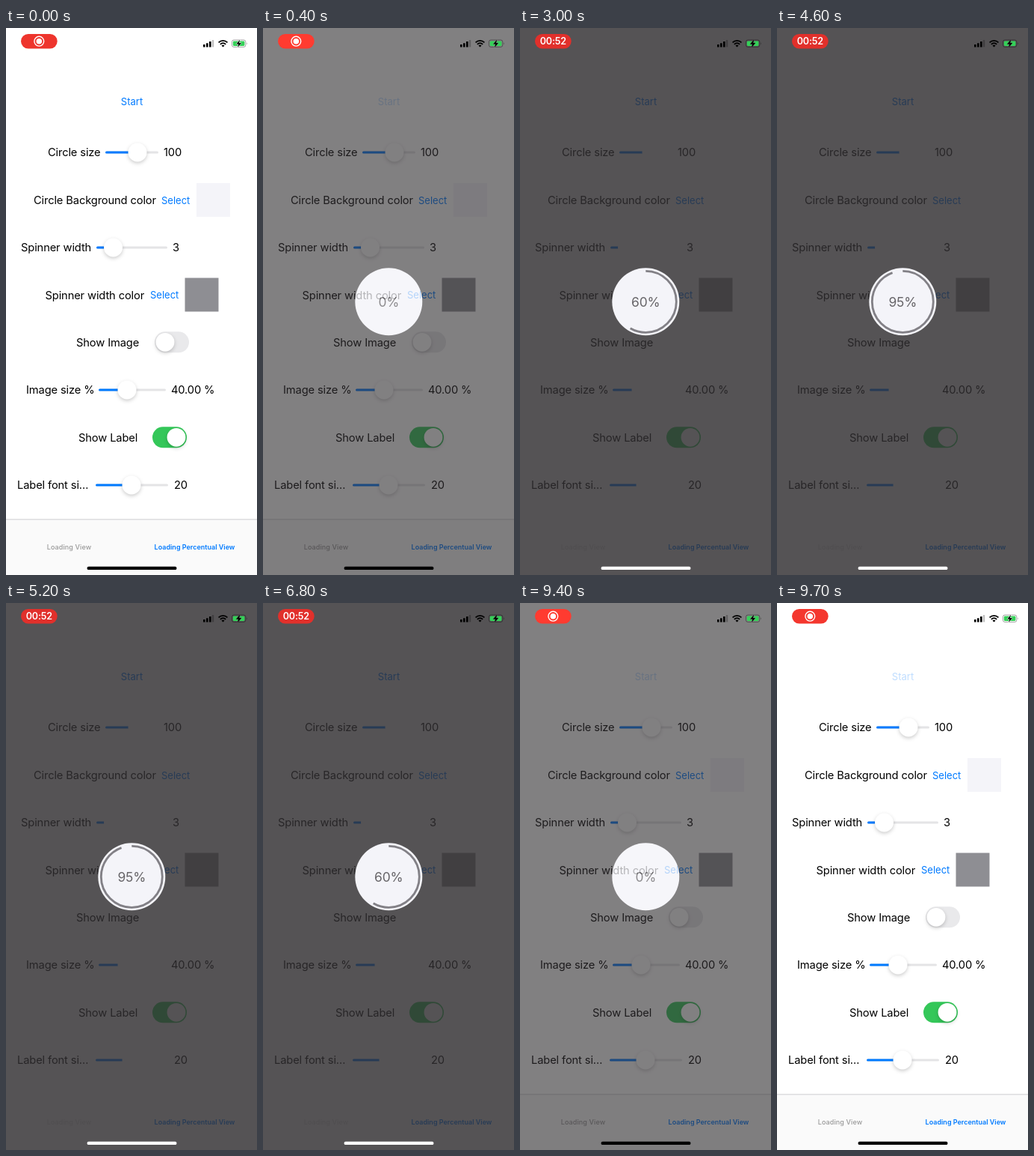
These frames come from a looping animation (336 px wide and 730 px high, 9800 ms). An HTML page:

```html
<!DOCTYPE html>
<html lang="en">
<head>
<meta charset="utf-8">
<title>Loading percentual view</title>
<style>
  html, body { margin: 0; width: 100%; height: 100%; overflow: hidden; background: #fff; }
  svg { display: block; width: 336px; height: 730px; }
  text { font: 14.7px Inter, sans-serif; letter-spacing: -.13px; fill: #000; }
  .link { font-size: 13px; letter-spacing: 0; fill: #007aff; }
  .tab { font-size: 9px; font-weight: 500; letter-spacing: .1px; fill: #999; }
  .tab.on { font-weight: 600; letter-spacing: 0; fill: #007aff; }
  .track { stroke: #e4e4e6; stroke-width: 3; stroke-linecap: round; }
  .fill { stroke: #007aff; stroke-width: 3; stroke-linecap: round; }
  .knob { fill: #fff; filter: drop-shadow(0 2.5px 2.5px #0003); }
  .deep .faint { visibility: hidden; }
  .deep .knob { filter: none; }
  .deep .dull { opacity: .3; }
</style>
</head>
<body>
<svg viewBox="0 0 336 730">
  <rect width="336" height="730" fill="#fff"/>
  <g id="page">
    <g class="faint">
      <rect y="656" width="336" height="74" fill="#fafafa"/>
      <rect y="655" width="336" height="1.5" fill="#dedee0"/>
    </g>
    <text id="start" class="link" x="168.5" y="103" text-anchor="middle">Start</text>
    <rect class="faint" x="255" y="207" width="45" height="45" fill="#f4f4f9"/>
    <rect x="239.5" y="333.5" width="45" height="45" fill="#8e8e93"/>
    <g id="controls"></g>
    <text class="tab dull" x="84.5" y="696" text-anchor="middle">Loading View</text>
    <text class="tab on" x="252.5" y="696" text-anchor="middle">Loading Percentual View</text>
  </g>
  <g id="overlay">
    <rect width="336" height="730" fill="#302e30" opacity=".82"/>
    <circle cx="168.3" cy="365.3" r="45" fill="#f4f4f9"/>
    <circle id="arc" cx="168.3" cy="365.3" r="41" fill="none" stroke="#828086" stroke-width="2.8"
      pathLength="100" transform="rotate(-90 168.3 365.3)"/>
    <text id="percent" x="168.3" y="371.7" text-anchor="middle" style="font-size:17.4px;fill:#666468"></text>
  </g>
  <rect id="pill" x="20" y="8" width="48.7" height="19.5" rx="9.75"/>
  <g id="record">
    <circle cx="44.3" cy="17.7" r="6.4" fill="none" stroke="#fff" stroke-width="1.4"/>
    <circle cx="44.3" cy="17.7" r="3.8" fill="#fff"/>
  </g>
  <text id="clock" x="44.3" y="22.2" text-anchor="middle" style="font-size:12.5px;font-weight:600;fill:#fff">00:52</text>
  <path d="M264 22h2.6v3.4h-2.6zM268 20.2h2.6v5.2H268zM272 18h2.6v7.4H272z"/>
  <path d="M275.8 16h2.4v9.4h-2.4z" opacity=".25"/>
  <g fill="none" stroke="#000" stroke-width="1.9">
    <path d="M284.6 19.3a8.3 8.3 0 0 1 11.8 0M286.9 21.8a5.1 5.1 0 0 1 7.2 0"/>
    <path d="M290.5 25.6l-2-2.1a2.9 2.9 0 0 1 4 0z" fill="#000" stroke="none"/>
  </g>
  <rect x="302.4" y="16" width="18.4" height="9.4" rx="2.6" fill="none" stroke="#000" stroke-opacity=".4" stroke-width=".9"/>
  <rect x="303.8" y="17.4" width="15.6" height="6.6" rx="1.4" fill="#34d158"/>
  <path d="M322 19.2q1.6 1.5 0 3z" opacity=".4"/>
  <path id="bolt" d="M313.2 15.6l-5 5.8h3l-1.2 4.6 5-6h-3z" stroke-width="1" paint-order="stroke"/>
  <rect id="home" x="108.5" y="718.7" width="120" height="4.4" rx="2.2"/>
</svg>
<script>
const $ = id => document.getElementById(id);
const label = (x, y, text, cls = '') => `<text class="${cls}" x="${x}" y="${y + 5.2}">${text}</text>`;
const link = (x, y) => `<text class="link" x="${x}" y="${y + 4.5}">Select</text>`;
const slider = (y, from, knob, to) => `
  <path class="track faint" d="M${from + 1.5} ${y}H${to - 1.5}"/>
  <path class="fill" d="M${from + 1.5} ${y}H${knob}"/>
  <circle class="knob" cx="${knob}" cy="${y}" r="12.5"/>`;
const toggle = (x, y, on) => `<g class="${on ? '' : 'faint'}">
  <rect x="${x}" y="${y - 14}" width="46" height="28" rx="14" fill="${on ? '#34c759' : '#e9e9eb'}"/>
  <circle class="knob" cx="${x + (on ? 32 : 14)}" cy="${y}" r="12.4"/></g>`;

$('controls').innerHTML = [
  label(56, 166, 'Circle size'), slider(166, 133, 176, 204), label(211, 166, '100'),
  label(37, 230, 'Circle Background color'), link(208, 230),
  label(20, 293, 'Spinner width'), slider(293, 121, 143.5, 216), label(223, 293, '3'),
  label(52.5, 356.5, 'Spinner width color'), link(193, 356.5),
  label(94, 419.5, 'Show Image'), toggle(199, 419.3, false),
  label(27, 483, 'Image size %'), slider(483, 124, 162, 214), label(221, 483, '40.00 %'),
  label(97, 546.5, 'Show Label'), toggle(196, 546.3, true),
  label(15, 610, 'Label font si…'), slider(610, 120, 168, 217), label(225, 610, '20')
].join('');

const ramp = (t, from, to) => Math.min(1, Math.max(0, (t - from) / (to - from)));
const smooth = (t, from, to) => { const u = ramp(t, from, to); return u * u * (3 - 2 * u); };
const mix = (a, b, u) => `rgb(${a.map((v, i) => Math.round(v + (b[i] - v) * u))})`;

const STEP = 225, FIRST = 450;

function draw(t) {
  const dim = smooth(t, 200, 500) * (1 - smooth(t, 4700, 5000));
  $('overlay').setAttribute('opacity', dim);
  $('page').setAttribute('class', dim === 1 ? 'deep' : '');
  $('start').style.opacity = t >= 100 && t < 500 ? .25 : 1;

  // The label jumps by 5 %, the arc glides after it
  const step = Math.min(20, Math.max(0, Math.floor((t - FIRST) / STEP) + 1));
  const begin = FIRST + (step - 1) * STEP;
  const shown = step && 5 * (step - 1 + ramp(t, begin, begin + 110));
  $('percent').textContent = step * 5 + '%';
  $('arc').setAttribute('stroke-dasharray', `${shown} 200`);
  $('arc').setAttribute('visibility', shown ? 'inherit' : 'hidden');

  const pulse = .5 + .5 * Math.cos((t - 400) / 1600 * 2 * Math.PI);
  $('pill').setAttribute('fill', mix([220, 46, 42], [255, 59, 48], pulse));
  $('clock').setAttribute('opacity', ramp(t, 1200, 1650));
  $('record').setAttribute('opacity', 1 - ramp(t, 1350, 1700));
  $('bolt').setAttribute('stroke', mix([255, 255, 255], [85, 83, 85], dim));
  $('home').setAttribute('fill', mix([0, 0, 0], [255, 255, 255], smooth(t, 950, 1850)));
}

// 98 ticks of 100 ms: forward to the middle, then the same way back
function loop(now) {
  const tick = Math.floor(now / 100) % 98;
  draw(Math.min(tick, 98 - tick) * 100);
  requestAnimationFrame(loop);
}
draw(0);
requestAnimationFrame(loop);
</script>
</body>
</html>
```
